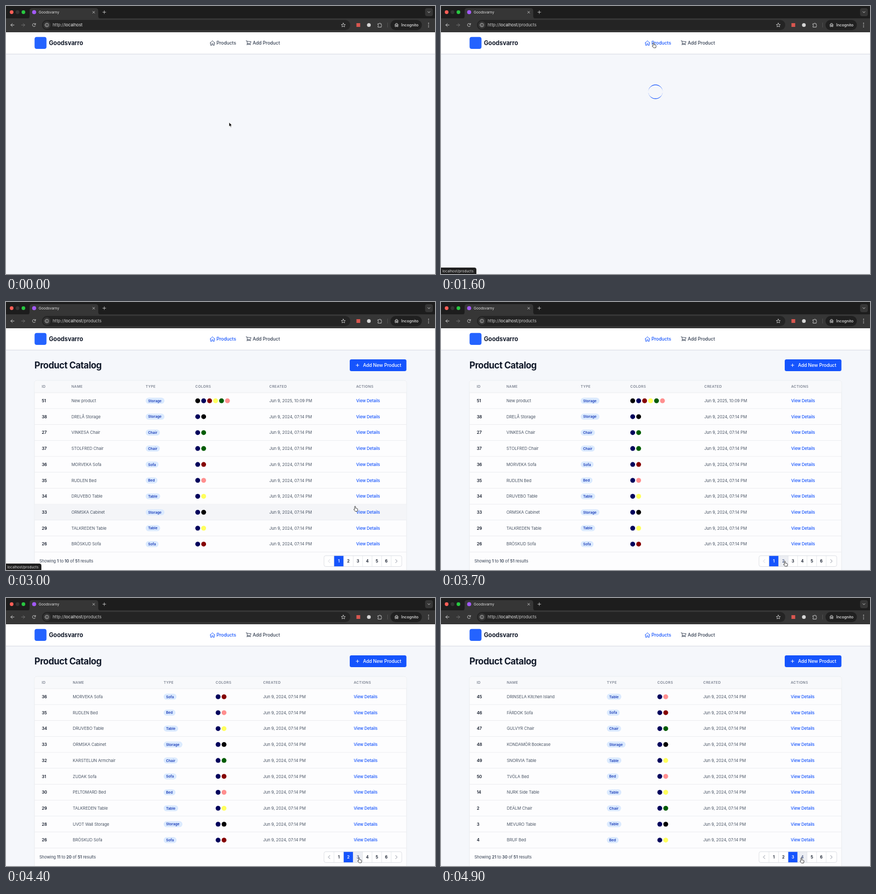
An HTML page that plays this animation: 800 by 500 pixels, repeating every 5 s.

```html
<!DOCTYPE html>
<html lang="en">
<head>
<meta charset="utf-8">
<title>Product catalog</title>
<style>
  html, body { margin: 0; height: 100%; overflow: hidden; background: #f5f7fb; }
  svg { display: block; width: 100%; height: 100vh; font-family: Inter, "Open Sans", sans-serif; }
  text { white-space: pre; }
</style>
</head>
<body>
<svg id="stage" viewBox="0 0 800 500"></svg>
<script>
const LOOP = 5000, STEP = 100;
const BLUE = '#1554fd', INK = '#101828', GRAY = '#4a5565', LINE = '#e5e7eb';
const DOTS = { k: '#000', n: '#00005c', r: '#850000', y: '#ffff5c', g: '#005c00', p: '#ff8f8f' };
const BADGE_WIDTH = { Storage: 35, Chair: 26.5, Sofa: 24, Bed: 22, Table: 27 };
const ROW_TOP = 169.2, ROW_HEIGHT = 29.72, CELL = 17.72, FIRST_CELL = 611.8;

// Column positions: name, type, colors, created, actions
const PAGES = [
  { cols: [122, 260.5, 353, 491, 653], rows: `51 New product|Storage|knrygp
38 DRELÅ Storage|Storage|nk
27 VINKESA Chair|Chair|ng
37 STOLFRED Chair|Chair|ng
36 MORVEKA Sofa|Sofa|nr
35 RUDLEN Bed|Bed|np
34 DRUVEBO Table|Table|ny
33 ORMSKA Cabinet|Storage|nk
29 TALKREDEN Table|Table|ny
26 BRÖSKUD Sofa|Sofa|nr` },
  { cols: [124.5, 294, 391, 479.5, 648.5], rows: `36 MORVEKA Sofa|Sofa|nr
35 RUDLEN Bed|Bed|np
34 DRUVEBO Table|Table|ny
33 ORMSKA Cabinet|Storage|nk
32 KARSTELUN Armchair|Chair|ng
31 ZUDAK Sofa|Sofa|nr
30 PELTOMARD Bed|Bed|np
29 TALKREDEN Table|Table|ny
28 UVOT Wall Storage|Storage|nk
26 BRÖSKUD Sofa|Sofa|nr` },
  { cols: [122.7, 309.3, 403.5, 489, 652.3], rows: `45 DRINSELA Kitchen Island|Table|np
46 FÄRDOK Sofa|Sofa|nr
47 GULVYR Chair|Chair|ng
48 KONDAMÖR Bookcase|Storage|nk
49 SNORVIA Table|Table|ny
50 TVÖLA Bed|Bed|np
14 NURK Side Table|Table|ny
2 DEÄLM Chair|Chair|ng
3 MEVURO Table|Table|nk
4 BRUF Bed|Bed|ny` }
];

// Pointer keys: time, x, y
const POINTER = [
  [0, 416, 217], [100, 414, 212], [300, 414, 212], [400, 409, 158], [500, 398, 64], [600, 396.3, 68.5],
  [2300, 396.3, 68.5], [3000, 651, 381], [3500, 639, 480], [3700, 641.3, 483.5],
  [4100, 641.3, 483.5], [4400, 658.3, 484.5], [4600, 658.3, 484.5], [4900, 672, 485]
];

function pointerAt(t) {
  const i = POINTER.findIndex(key => key[0] >= t);
  if (i <= 0) return POINTER[i < 0 ? POINTER.length - 1 : 0].slice(1);
  const [t0, x0, y0] = POINTER[i - 1], [t1, x1, y1] = POINTER[i];
  const p = (t - t0) / (t1 - t0), e = p * p * (3 - 2 * p);
  return [x0 + (x1 - x0) * e, y0 + (y1 - y0) * e];
}

// Text whose capitals are centred on cy
const text = (x, cy, s, size, fill, weight = 400, extra = '') =>
  `<text x="${x}" y="${cy + size * .364}" font-size="${size}" fill="${fill}" font-weight="${weight}" ${extra}>${s}</text>`;
const rect = (x, y, w, h, fill, r = 0, extra = '') =>
  `<rect x="${x}" y="${y}" width="${w}" height="${h}" rx="${r}" fill="${fill}" ${extra}/>`;
const dot = (x, y, r, fill) => `<circle cx="${x}" cy="${y}" r="${r}" fill="${fill}"/>`;
const icon = (x, y, d, color, width = .9) =>
  `<path transform="translate(${x} ${y})" d="${d}" fill="none" stroke="${color}" stroke-width="${width}" stroke-linecap="round" stroke-linejoin="round"/>`;
const tight = 'letter-spacing="-.01em"';

function browser(path) {
  const light = '#d6d6d6';
  return rect(0, 0, 800, 24, '#1d1d1d') + rect(0, 23, 800, 26, '#363636') +
    dot(10.5, 11.5, 3.4, '#ff5f57') + dot(21.5, 11.5, 3.4, '#363636') + dot(32.5, 11.5, 3.4, '#28c840') +
    '<path d="M39 23.5Q44 23.5 44 19V9Q44 4 49 4H167Q172 4 172 9V19Q172 23.5 177 23.5Z" fill="#363636"/>' +
    dot(52.5, 11.5, 3.8, '#a259f5') + text(61, 11.7, 'Goodsvarny', 6.67, '#e3e3e3') +
    icon(163.5, 11.7, 'M-1.8-1.8 1.8 1.8M1.8-1.8-1.8 1.8', light, .8) +
    icon(183.3, 11.5, 'M-2.8 0H2.8M0-2.8V2.8', light, .8) +
    rect(781.5, 4, 14.5, 15, '#363636', 4) + icon(788.7, 11.5, 'M-2-1 0 1 2-1', light) +
    icon(12, 35.5, 'M3 0H-3M0-3-3 0 0 3', light) + icon(32, 35.5, 'M-3 0H3M0-3 3 0 0 3', '#757575') +
    icon(52.3, 35.5, 'M2.5 1.3A2.9 2.9 0 1 1 2.2-1.9M2.8-3V-1H.8', light) +
    rect(67, 26, 575, 19, '#242424', 9.5) + dot(76.2, 35.5, 7, '#363636') +
    icon(76.2, 35.5, 'M-3.3 0A3.3 3.3 0 1 0 3.3 0A3.3 3.3 0 1 0-3.3 0M0-.2V1.6M0-1.6V-1.5', light, .8) +
    text(87, 35.5, `<tspan fill="#c8c8c8">http://</tspan>localhost<tspan fill="#c8c8c8">${path}</tspan>`, 7.8, '#ececec') +
    icon(629, 35.6, 'M0-3.7 1.1-1.2 3.8-1 1.8.8 2.4 3.4 0 2-2.4 3.4-1.8.8-3.8-1-1.1-1.2Z', light, .8) +
    rect(653.5, 32, 7, 7, '#d9564f') + dot(676.7, 35.5, 3.5, light) +
    icon(697, 35.5, 'M-3.3-2.3H-1A1.2 1.2 0 0 1 1.4-2.3H2.8V0A1.2 1.2 0 0 1 2.8 2.2V3.9H-3.3V1.8A1.2 1.2 0 0 0-3.3-.5Z', light) +
    rect(711.3, 31, .8, 9, '#5a5a5a') + rect(717, 26, 58.5, 19, '#202020', 9.5) +
    icon(728.3, 35.5, 'M-3.5-.3H3.5M-2-.6-1.4-3H1.4L2-.6M-2.9 2.1A1.2 1.2 0 1 0-.5 2.1A1.2 1.2 0 1 0-2.9 2.1M.5 2.1A1.2 1.2 0 1 0 2.9 2.1A1.2 1.2 0 1 0 .5 2.1M-.5 1.8H.5', '#e3e3e3', .8) +
    text(737, 35.5, 'Incognito', 7.2, '#e8e8e8', 500) +
    [32.2, 35.5, 38.8].map(y => dot(788, y, .85, light)).join('');
}

function siteHeader(productsActive) {
  const nav = productsActive ? BLUE : '#364153';
  return rect(0, 89, 800, 1, '#dfe2e8') + rect(0, 90, 800, 1, '#eef0f5') + rect(0, 49, 800, 40, '#fff') +
    rect(53.3, 57.8, 22.2, 22.2, '#2463ff', 4) + text(80, 69, 'Goodsvarro', 11.1, INK, 700) +
    icon(385, 69, 'M-4.5.2 0-4.3 4.5.2M-3.4-.9V4.3H-1.1V1.4H1.1V4.3H3.4V-.9', nav) +
    text(392.5, 69, 'Products', 8.7, nav, 500, tight) +
    icon(452.5, 69, 'M-4.6-4.3H-3.6L-2.1 1H3.1L4.5-2.5-3.1-3.1M-2.1 1A1.4 1.4 0 0 0-3.3 2.5H3.9M-2.9 3.9V4M2.8 3.9V4', '#364153') +
    text(460, 69, 'Add Product', 8.7, '#364153', 500, tight);
}

function spinner(angle) {
  return `<path transform="translate(400 160) rotate(${angle})" fill="${BLUE}" fill-rule="evenodd"
    d="M-13.4 0A13.4 13.4 0 1 1 13.4 0A13.4 13.4 0 1 1-13.4 0M-13.4 0A13.4 12.3 0 1 1 13.4 0A13.4 12.3 0 1 1-13.4 0"/>`;
}

function tableRow(line, i, cols, hovered) {
  const [head, type, colors] = line.split('|');
  const [, id, name] = head.match(/^(\d+) (.*)$/);
  const top = ROW_TOP + i * ROW_HEIGHT, cy = top + 15;
  const [nameX, typeX, colorX, dateX, linkX] = cols;
  const date = id === '51' ? 'Jun 9, 2025, 10:09 PM' : 'Jun 9, 2024, 07:14 PM';
  return (hovered ? rect(53.3, top, 693.4, ROW_HEIGHT, '#f4f5f8') : '') +
    rect(53.3, top + ROW_HEIGHT - .4, 693.4, .7, LINE) +
    text(66.7, cy, id, 7.7, INK, 600, tight) + text(nameX, cy, name, 7.7, GRAY, 400, tight) +
    rect(typeX, cy - 5.6, BADGE_WIDTH[type], 11.2, '#dbeafe', 5.6) +
    text(typeX + 4.4, cy, type, 6.67, '#193cb8', 600) +
    [...colors].map((c, k) => dot(colorX + 4.5 + k * 11.1, cy, 4.5, DOTS[c])).join('') +
    text(dateX, cy, date, 7.7, GRAY, 400, tight) + text(linkX, cy, 'View Details', 7.7, BLUE, 500, tight);
}

function pagination(page, hovered) {
  const cy = 483.4;
  let out = rect(593, 473.3, 145, 20.2, '#fff', 3.3);
  for (let n = 1; n <= 6; n++) {
    const x = FIRST_CELL + (n - 1) * CELL, active = n === page, over = n === hovered;
    if (active || over) out += rect(x, 473.3, CELL, 20.2, active ? BLUE : '#eceef3');
    out += rect(x - .3, 473.3, .6, 20.2, '#d8dbe1') +
      text(x + CELL / 2, cy, n, 7.7, active ? '#fff' : over ? '#4a5a85' : INK, 600, 'text-anchor="middle"');
  }
  return out + rect(FIRST_CELL + 6 * CELL - .3, 473.3, .6, 20.2, '#d8dbe1') +
    rect(593, 473.3, 145, 20.2, 'none', 3.3, 'stroke="#d1d5dc" stroke-width=".7"') +
    icon(602.5, cy, 'M1.4-3-1.4 0 1.4 3', page === 1 ? '#c6cad2' : '#6a7282', .8) +
    icon(728, cy, 'M-1.4-3 1.4 0-1.4 3', '#6a7282', .8);
}

function catalog(page, [px, py]) {
  const { cols, rows } = PAGES[page - 1];
  const rowUnder = Math.floor((py - ROW_TOP) / ROW_HEIGHT);
  const cellUnder = py > 473 && py < 494 ? Math.floor((px - FIRST_CELL) / CELL) + 1 : 0;
  const headings = ['ID', 'NAME', 'TYPE', 'COLORS', 'CREATED', 'ACTIONS'];
  const strong = n => `<tspan font-weight="600">${n}</tspan>`;
  return text(53, 118, 'Product Catalog', 16.7, INK, 700, 'letter-spacing="-.025em"') +
    rect(641, 107, 105.7, 22, BLUE, 3.3) + icon(655.5, 118, 'M-2.6 0H2.6M0-2.6V2.6', '#fff') +
    text(665.7, 118, 'Add New Product', 8.7, '#fff', 500, tight) +
    rect(53, 146.3, 694, 370, '#fdfdfe', 4.4, 'stroke="#e7e9ee" stroke-width=".9"') +
    rect(53.4, 146.8, 693.2, 22.4, '#f8f9fb', 4) + rect(53.3, 168.8, 693.4, .7, LINE) +
    headings.map((h, i) => text([66.7, ...cols][i], 158, h, 6.67, '#6a7282', 500, 'letter-spacing=".05em"')).join('') +
    rows.split('\n').map((line, i) => tableRow(line, i, cols, i === rowUnder)).join('') +
    text(62.2, 483.4, `Showing ${strong(page * 10 - 9)} to ${strong(page * 10)} of ${strong(51)} results`, 7.7, '#364153', 400, tight) +
    pagination(page, cellUnder);
}

function pointer([x, y], isHand) {
  const hand = 'M-.9.9A.9.9 0 0 1 .9.9V3.6L4 4.4Q5.1 4.8 4.9 6L4.2 9.5H.2L-2.5 6.3Q-2.5 5-.9 6Z';
  const arrow = 'M0 0V8L1.8 6.4 3 9.2 4.3 8.6 3.1 5.9H5.5Z';
  return `<path transform="translate(${x} ${y})" d="${isHand ? hand : arrow}" fill="${isHand ? '#fff' : '#000'}"
    stroke="${isHand ? '#000' : '#fff'}" stroke-width=".7" stroke-linejoin="round"/>`;
}

function scene(t) {
  const pos = pointerAt(t), [x, y] = pos;
  const visited = t >= 1600;
  const page = t < 1800 ? 0 : t < 3900 ? 1 : t < 4600 ? 2 : 3;
  const overNav = x > 378 && x < 430 && y > 60 && y < 78;
  const overLink = page && ((x > 650 && x < 698 && y > ROW_TOP && y < 466) || (y > 473 && x > 593));
  return rect(0, 0, 800, 500, '#f5f7fb') + browser(visited ? '/products' : '') + siteHeader(visited || overNav) +
    (page ? catalog(page, pos) : visited ? spinner((t - 1600) * .36) : '') +
    (visited && t < 3300
      ? '<path d="M0 488H62Q66 488 66 492V500H0Z" fill="#202020"/>' + text(2.5, 494.2, 'localhost/products', 6.6, '#dcdcdc')
      : '') +
    pointer(pos, overNav || overLink);
}

const stage = document.getElementById('stage');
let shown = -1;
function draw() {
  const t = Math.floor(performance.now() % LOOP / STEP) * STEP;
  if (t !== shown) stage.innerHTML = scene(shown = t);
  requestAnimationFrame(draw);
}
draw();
</script>
</body>
</html>
```
